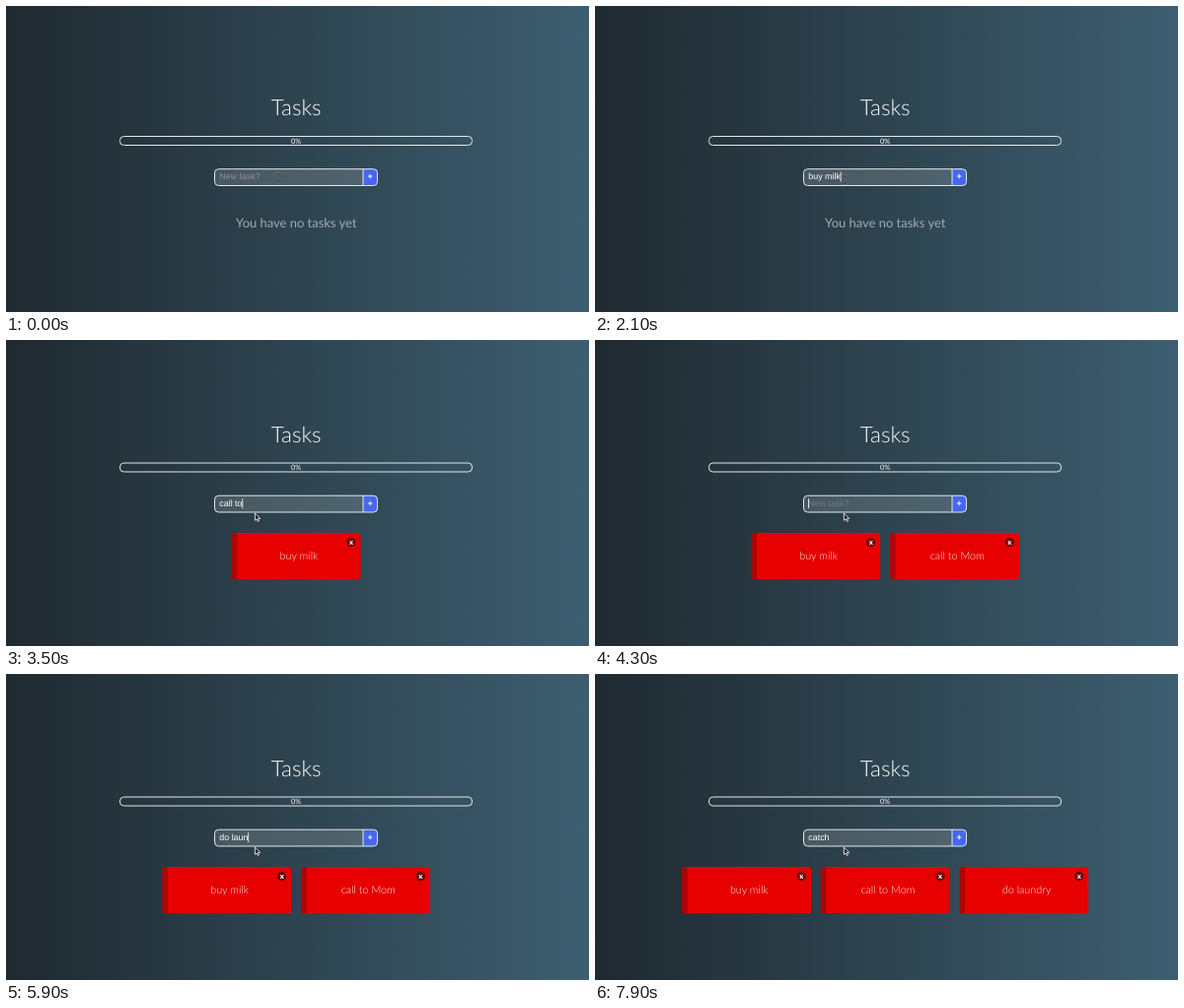
An HTML page that plays this animation: 591x311 px, repeating every 8000 ms.

```html
<!DOCTYPE html>
<html lang="en">
<head>
<meta charset="utf-8">
<title>Tasks</title>
<style>
  html, body { margin: 0; width: 100%; height: 100%; overflow: hidden; }
  body { background: linear-gradient(to right, #1f2930, #2e4450 50%, #3d5e71); }
  svg { display: block; width: 591px; height: 311px; font-family: Lato, sans-serif; }
  text { fill: #fff; white-space: pre; text-rendering: geometricPrecision; }
  .mid { text-anchor: middle; }
  .title { font-size: 22.4px; font-weight: 300; }
  .percent { font-size: 7.4px; }
  .empty { font-size: 12.95px; fill: #a3a9ad; }
  .field { font: 8.9px "Liberation Sans", Arial, sans-serif; }
  .hint { fill: #8b9194; }
  .focus .hint { fill: #6e7b81; }
  .plus { font: bold 9px "Liberation Sans", Arial, sans-serif; }
  .line { fill: none; stroke: #e4e8ea; stroke-width: 1; }
  .name { font-size: 10.8px; font-weight: 300; fill: #ffe9e9; }
  .close { font-size: 7.4px; font-weight: 900; }
</style>
</head>
<body>
<svg viewBox="0 0 591 311">
  <defs>
    <clipPath id="round"><rect width="131" height="47.5" rx="3.5"/></clipPath>
  </defs>
  <g id="head">
    <text class="mid title" x="294.2" y="111.2">Tasks</text>
    <rect class="line" x="115.5" y="132.5" width="357" height="9" rx="4"/>
    <text class="mid percent" x="294" y="139.8">0%</text>
    <rect x="211.5" y="165.7" width="165" height="16.8" rx="4" fill="#fff" fill-opacity=".14"/>
    <path d="M362 165.7H372.5a4 4 0 0 1 4 4v8.8a4 4 0 0 1-4 4H362z" fill="#4667f0"/>
    <rect class="line" x="211.5" y="165.7" width="165" height="16.8" rx="4"/>
    <path class="line" d="M362 165.7v16.8"/>
    <text class="mid plus" x="369.2" y="176.2">+</text>
    <text class="field hint" id="hint" x="216.3" y="176.2">New task?</text>
    <text class="field" id="typed" x="216.3" y="176.2"></text>
    <rect id="caret" y="168.6" width=".8" height="10" fill="#fff"/>
  </g>
  <text class="mid empty" id="empty" x="294.2" y="224.6">You have no tasks yet</text>
  <g id="cards"></g>
  <g id="beam" fill="none" stroke-linecap="round">
    <path d="M-1.6-4.5Q0-4.5 0-3.5V3.5Q0 4.5-1.6 4.5M1.6-4.5Q0-4.5 0-3.5M0 3.5Q0 4.5 1.6 4.5" stroke="#8f999d" stroke-width="1.6"/>
    <path d="M-1.6-4.5Q0-4.5 0-3.5V3.5Q0 4.5-1.6 4.5M1.6-4.5Q0-4.5 0-3.5M0 3.5Q0 4.5 1.6 4.5" stroke="#15191c" stroke-width=".8"/>
  </g>
  <path id="arrow" d="M252.4 176V183.4L254.1 181.9L255.3 184.5L256.5 183.9L255.4 181.4H257.6Z"
    fill="#15191c" stroke="#fff" stroke-width=".8" stroke-linejoin="round"/>
</svg>
<script>
const LOOP = 8000, STEP = 100, CLICK = 800, BLINK = 500;
const PITCH = 140.7, CARD_W = 131, CENTER = 294.2, CARD_Y = 196;

// Key times for each letter, then the time Enter adds the task.
const entries = [
  { text: "buy milk", keys: [1100, 1200, 1300, 1400, 1500, 1600, 1700, 1800], enter: 2300 },
  { text: "call to Mom", keys: [2900, 3000, 3100, 3200, 3300, 3400, 3500, 3600, 3800, 4000, 4100], enter: 4200 },
  { text: "do laundry", keys: [5000, 5100, 5200, 5300, 5500, 5700, 5900, 6100, 6200, 6300], enter: 6400 },
  { text: "catch", keys: [7000, 7100, 7200, 7300, 7400], enter: Infinity }
];

const $ = id => document.getElementById(id);
const show = (el, on) => el.setAttribute("visibility", on ? "visible" : "hidden");
const move = (el, x, y) => el.setAttribute("transform", `translate(${x} ${y})`);

const cards = entries.slice(0, 3).map(({ text }) => {
  const g = document.createElementNS("http://www.w3.org/2000/svg", "g");
  g.innerHTML = `
    <g clip-path="url(#round)">
      <rect width="131" height="47.5" fill="#e60000"/>
      <rect width="5.7" height="47.5" fill="#ad0505"/>
    </g>
    <text class="mid name" x="68.2" y="26.9">${text}</text>
    <circle cx="121.3" cy="9.6" r="4.6" fill="#680808"/>
    <text class="mid close" x="121.3" y="11.7">x</text>`;
  $("cards").append(g);
  return g;
});

function draw(time) {
  const t = Math.floor(time / STEP) * STEP;
  const done = entries.filter(e => t >= e.enter).length;
  const entry = entries[done];
  const count = entry.keys.filter(k => t >= k).length;
  const focused = t >= CLICK;

  move($("head"), 0, done ? -7.5 : 0);
  $("head").classList.toggle("focus", focused);
  $("typed").textContent = entry.text.slice(0, count);
  show($("hint"), !count);
  show($("empty"), !done);

  // The caret restarts its blink after every key.
  const last = Math.max(CLICK, ...entries.flatMap(e => [...e.keys, e.enter]).filter(k => k <= t));
  show($("caret"), focused && (t - last) % (2 * BLINK) < BLINK);
  const width = count ? $("typed").getComputedTextLength() : 0;
  $("caret").setAttribute("x", 216.2 + width);

  const left = CENTER - (CARD_W + PITCH * (done - 1)) / 2;
  cards.forEach((card, i) => {
    show(card, i < done);
    move(card, left + PITCH * i, CARD_Y);
  });

  const p = Math.min(1, t / CLICK), ease = p * p * (3 - 2 * p);
  move($("beam"), 277 - 24 * ease, 174.5 + 2 * ease);
  show($("beam"), !done);
  show($("arrow"), done);
}

const start = performance.now();
function tick() {
  draw((performance.now() - start) % LOOP);
  requestAnimationFrame(tick);
}
tick();
</script>
</body>
</html>
```
